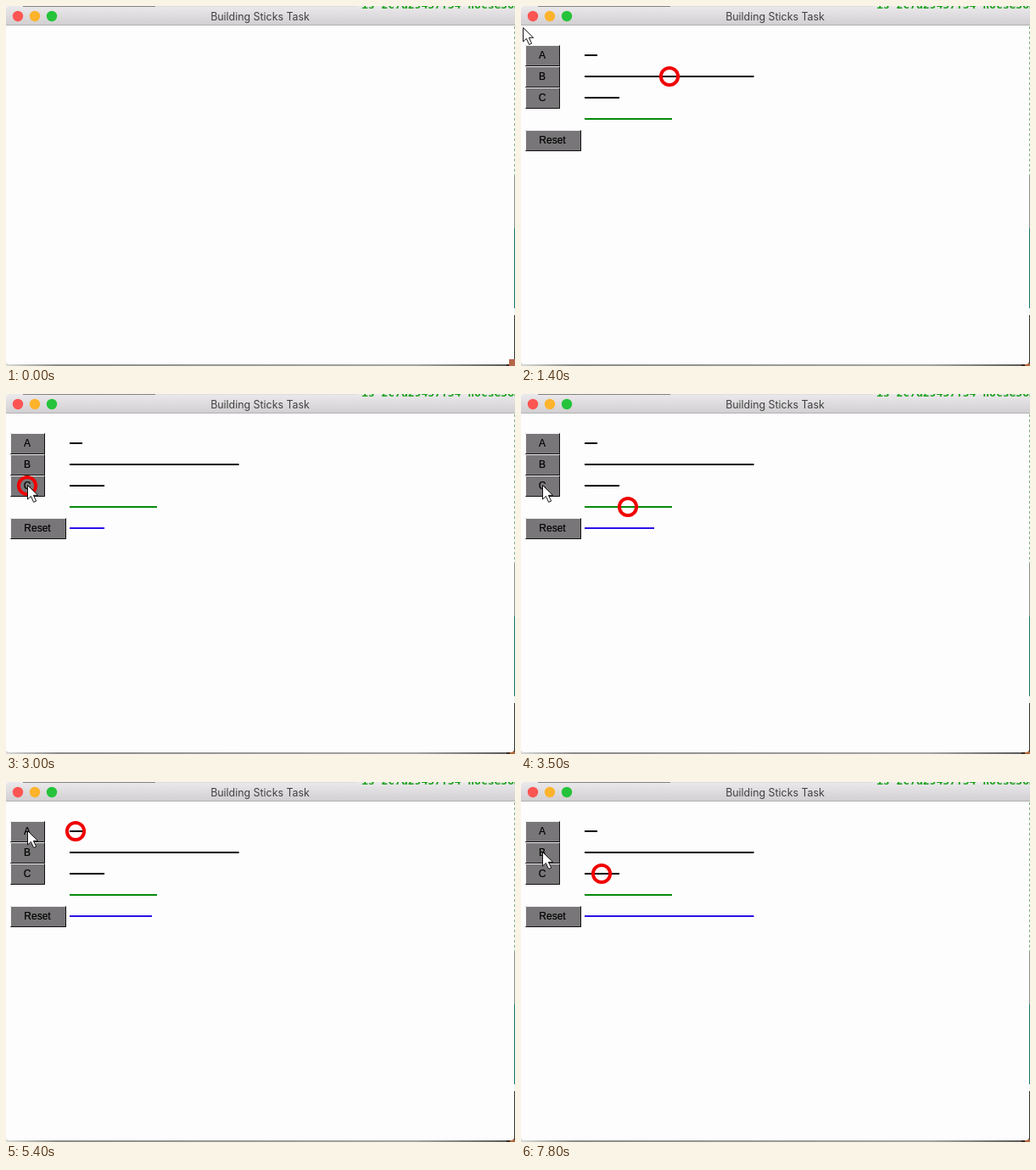
An HTML page that plays this animation: 600 px wide and 424 px high, repeating every 8000 ms.

```html
<!DOCTYPE html>
<html lang="en">
<head>
<meta charset="utf-8">
<title>Building Sticks Task</title>
<style>
  html, body { margin: 0; width: 100%; height: 100%; overflow: hidden; }
  svg { display: block; width: 600px; height: 424px; }
  text { text-anchor: middle; }
  .title { font: 12.4px Inter, sans-serif; fill: #404040; }
  .button text { font: 12px "Liberation Sans", Arial, sans-serif; fill: #000; stroke: #000; stroke-width: .2; }
  .code { font: bold 13px "DejaVu Sans Mono", monospace; fill: #18a018; text-anchor: start; }
  .light, .dark { fill: none; stroke-width: 1; }
  .light { stroke: #f4f4f4; }
  .dark { stroke: #111; }
  .pressed .light { stroke: #111; }
  .pressed .dark { stroke: #f4f4f4; }
</style>
</head>
<body>
<svg viewBox="0 0 600 424">
  <defs>
    <linearGradient id="bar" x2="0" y2="1">
      <stop stop-color="#ebe9eb"/><stop offset="1" stop-color="#d0ced0"/>
    </linearGradient>
    <linearGradient id="shade">
      <stop stop-color="#d8d8d8"/><stop offset=".1" stop-color="#8c8c8c"/>
      <stop offset=".8" stop-color="#a4a4a4"/><stop offset="1" stop-color="#555"/>
    </linearGradient>
  </defs>

  <!-- desktop showing around the window -->
  <rect width="600" height="424" fill="#f4f4f4"/>
  <rect y="420" width="600" height="4" fill="url(#shade)"/>
  <path d="M599.5 24V200" stroke="#7fae7f" stroke-dasharray="3 3"/>
  <path d="M599.5 200V262" stroke="#8a8f8a"/>
  <path d="M599.5 262V356" stroke="#12766c"/>
  <path d="M599.5 364V424" stroke="#333"/>
  <rect x="590" y="420" width="10" height="4" fill="#3a2a22"/>
  <rect x="594" y="421" width="6" height="3" fill="#b0643c"/>

  <!-- window -->
  <path d="M0 22H599V418Q599 422 595 422H4Q0 422 0 418Z" fill="#fefdfe"/>
  <rect id="corner" x="593" y="416" width="7" height="8" fill="#b5674a"/>
  <path d="M0 23V5Q0 0 5 0H595Q600 0 600 5V23Z" fill="url(#bar)"/>
  <path d="M0 22.5H600" stroke="#b3b1b3"/>
  <path d="M20 .4H176" stroke="#777"/>
  <path d="M176 .4H415" stroke="#ddd"/>
  <text class="code" x="419" y="2.5">is 2c7d29457f54 nocse5omp</text>
  <circle cx="14" cy="12" r="6.2" fill="#fc5552"/>
  <circle cx="34" cy="12" r="6.2" fill="#fdb32c"/>
  <circle cx="54" cy="12" r="6.2" fill="#25c33c"/>
  <text class="title" x="299.5" y="17">Building Sticks Task</text>

  <g id="task"></g>
  <circle id="ring" r="10.1" fill="none" stroke="#f00000" stroke-width="4"/>
  <path id="cursor" d="M.5 .5V17L4.4 13.4L7.6 20.4L10.6 19.1L7.4 12.3H12.6Z" fill="#fff" stroke="#111"/>
</svg>
<script>
const LOOP = 8000, LEFT = 75;
const el = id => document.getElementById(id);
const task = el('task');

const button = (label, y, w) => `<g class="button" id="btn${label}">
  <rect x="5" y="${y}" width="${w}" height="25" fill="#787678"/>
  <path class="light" d="M5.5 ${y + 24.5}V${y + .5}H${w + 4.5}"/>
  <path class="dark" d="M5.5 ${y + 24.5}H${w + 4.5}V${y + .5}"/>
  <text x="${w > 50 ? 37 : 25}" y="${y + 16}">${label}</text></g>`;
const stick = (y, end, color, id = '') =>
  `<path id="${id}" d="M${LEFT} ${y}H${end}" stroke="${color}" stroke-width="2"/>`;

task.innerHTML = button('A', 46, 41) + button('B', 71, 41) + button('C', 96, 41) +
  button('Reset', 146, 66) +
  stick(58, 90, '#000') + stick(83, 274.5, '#000') + stick(108, 116, '#000') +
  stick(133, 178, '#078a0c') + stick(158, LEFT, '#2b12e6', 'built');

const spots = {
  a: [82, 58], b: [175, 83], c: [95, 108], goal: [126, 133],
  A: [25, 58], B: [25, 83], C: [25, 108], Reset: [37.5, 158]
};

// Each track lists [start time, value]; the value holds until the next entry.
const gaze = [[0, ''], [400, 'a'], [600, 'b'], [800, 'c'], [1000, 'goal'], [1200, 'c'],
  [1400, 'b'], [1600, 'C'], [2500, 'built'], [2700, 'goal'], [2800, 'c'], [3000, 'C'],
  [3300, 'built'], [3500, 'goal'], [3600, 'c'], [3800, 'a'], [4000, 'A'], [5000, 'built'],
  [5200, 'goal'], [5400, 'a'], [5600, 'Reset'], [6600, 'B'], [7500, 'built'],
  [7600, 'goal'], [7800, 'c']];
const pointer = [[0, [2, 25]], [2000, [25, 107]], [4400, [25, 57]],
  [6000, [37, 157]], [6900, [25, 82]]];
const clicks = [[2300, 'C'], [3100, 'C'], [4700, 'A'], [6300, 'Reset'], [7300, 'B']];
const builtEnd = [[0, LEFT], [2400, 116], [3200, 157], [4800, 172], [6400, LEFT], [7400, 274.5]];

const at = (track, t) => track.findLast(([start]) => start <= t)[1];
const place = (node, [x, y]) => node.setAttribute('transform', `translate(${x} ${y})`);
const show = (node, on) => node.setAttribute('visibility', on ? 'visible' : 'hidden');

function draw(t) {
  const open = t >= 100;
  show(task, open);
  show(el('cursor'), open);
  show(el('corner'), !open);

  const end = at(builtEnd, t);
  el('built').setAttribute('d', `M${LEFT} 158H${end}`);
  for (const label of ['A', 'B', 'C', 'Reset']) {
    const down = clicks.some(([start, name]) => name === label && t >= start && t < start + 100);
    el('btn' + label).classList.toggle('pressed', down);
  }

  const look = at(gaze, t);
  show(el('ring'), look);
  if (look) place(el('ring'), spots[look] || [(LEFT + end) / 2, 158]);
  place(el('cursor'), at(pointer, t));
}

const origin = performance.now();
function tick() {
  draw((performance.now() - origin) % LOOP);
  requestAnimationFrame(tick);
}
tick();
</script>
</body>
</html>
```
